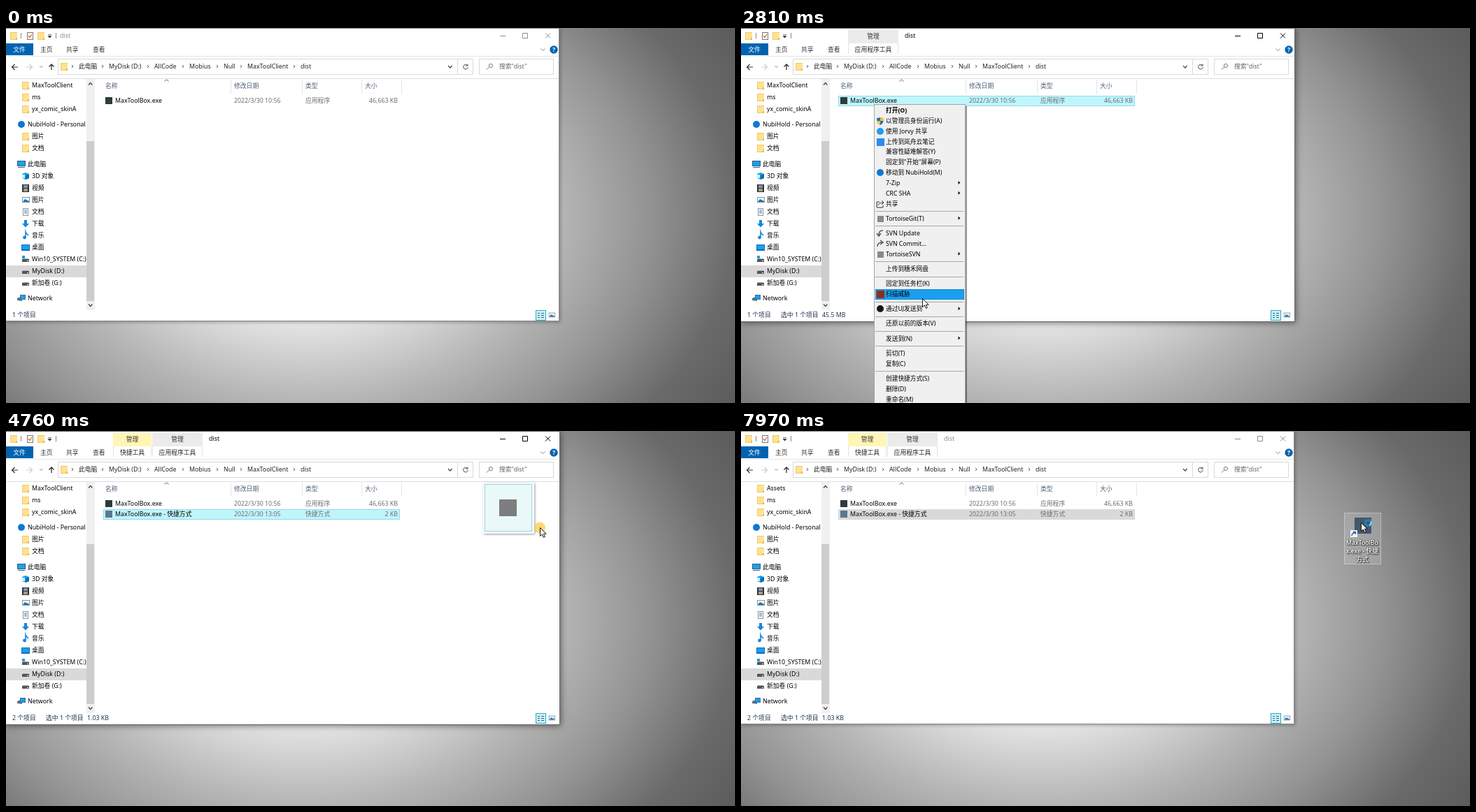
Recreate the animation shown at these times as an HTML page with a canvas. Size 1042 by 537 pixels, loop 8 s.

```html
<!DOCTYPE html>
<html lang="zh-CN">
<head>
<meta charset="utf-8">
<title>dist</title>
<style>
  html, body { margin: 0; width: 100%; height: 100%; overflow: hidden; background: #888; }
  canvas { display: block; }
</style>
</head>
<body>
<canvas id="stage" width="1042" height="537"></canvas>
<script>
const g = document.getElementById('stage').getContext('2d');
const LOOP = 8000;
const FONT = '"Noto Sans", "Noto Sans CJK SC", sans-serif';
const BLUE = '#0063b1', SKY = '#1a9ff0';

// Moments when the state switches
const FOCUS = 840, MENU = 1460, PICK = 3600, CREATED = 3760, DRAG = 4320, DROP = 5190, PLACED = 5570, BUSY = 6680;
const clicks = [[840, 1150], [1370, 1500], [3460, 3600], [DRAG, DROP], [6400, 6490], [6570, 6660]];

// Pointer path: time, x, y
const route = [
  [150, 582, 507], [350, 400, 290], [500, 240, 140], [600, 198, 111], [680, 190, 108],
  [1940, 190, 108], [2080, 212, 118], [2270, 236, 126], [2600, 236, 126], [2700, 243, 230],
  [2810, 259, 387], [2950, 262, 455], [3160, 256, 497], [3650, 256, 497], [3850, 240, 350],
  [3980, 228, 210], [4080, 225, 163], [4240, 222, 119], [4400, 222, 119], [4560, 420, 130],
  [4760, 762, 138], [4900, 840, 143], [5060, 864, 144], [5420, 864, 144], [5570, 854, 150],
  [5790, 854, 150], [5940, 870, 129], [6270, 870, 129], [6380, 886, 131]
];

function pointerAt(t) {
  const i = route.findIndex(k => k[0] > t);
  if (i < 0) return route.at(-1).slice(1);
  if (i === 0) return route[0].slice(1);
  const [a, b] = [route[i - 1], route[i]], p = (t - a[0]) / (b[0] - a[0]);
  return [a[1] + (b[1] - a[1]) * p, a[2] + (b[2] - a[2]) * p];
}

function rect(x, y, w, h, fill, border) {
  if (fill) { g.fillStyle = fill; g.fillRect(x, y, w, h); }
  if (border) { g.strokeStyle = border; g.lineWidth = 1; g.strokeRect(x + .5, y + .5, w - 1, h - 1); }
}
function text(str, x, y, color = '#000', align = 'left', weight = 400, size = 8.8) {
  g.font = `${weight} ${size}px ${FONT}`;
  g.textAlign = align;
  g.fillStyle = color;
  g.fillText(str, x, Math.round(y + 3));
}
function path(d, stroke, fill, width = 1) {
  const p = new Path2D(d);
  if (fill) { g.fillStyle = fill; g.fill(p); }
  if (stroke) { g.strokeStyle = stroke; g.lineWidth = width; g.stroke(p); }
}
function dot(x, y, r, fill) {
  g.fillStyle = fill;
  g.beginPath();
  g.arc(x, y, r, 0, 7);
  g.fill();
}
function at(x, y, draw) {
  g.save();
  g.translate(x, y);
  draw();
  g.restore();
}
function shadow(color, blur, offset) {
  g.shadowColor = color;
  g.shadowBlur = blur;
  g.shadowOffsetX = g.shadowOffsetY = offset;
}

// Icons are drawn around their centre
const icons = {
  folder() { rect(-5, -5, 10, 11, '#f4c95f'); rect(-4, -4, 9, 9, '#ffe196'); rect(3, 3, 2, 3, '#e9b84b'); },
  cloud() { dot(0, 0, 5, '#0f78d4'); },
  pc() { rect(-6, -5, 12, 8, SKY, '#3a5a78'); rect(-5, 4, 10, 1, '#3a5a78'); },
  cube() { path('M-5-3L0-5L5-3V3L0 5L-5 3Z', null, '#16a0dc'); path('M0-1L5-3V3L0 5Z', null, '#0b6fb0'); rect(-5, -2, 4, 5, '#c9f0ff'); },
  video() { rect(-5, -5, 10, 11, '#333'); rect(-3, -4, 6, 4, '#8192b8'); rect(-3, 1, 6, 4, '#a99c8a'); },
  picture() { rect(-5, -4, 11, 8, '#eef6fa', '#8a949c'); path('M-4 3L-1-1L5 2V3Z', null, '#1874b8'); },
  doc() { rect(-4, -5, 8, 11, '#fff', '#8795a3'); path('M-2-2H2M-2 0H2M-2 2H2', '#3f83b8'); },
  download() { path('M-2-5H2V0H5L0 5.5L-5 0H-2Z', null, '#1687dc'); },
  music() { path('M0 3V-5Q1-2 4 0', '#1687dc', null, 1.6); dot(-1.5, 3, 2.4, '#1687dc'); },
  desktop() { rect(-6, -4, 12, 9, '#0a6fb8'); rect(-5, -3, 10, 6, SKY); },
  drive() { rect(-5, 0, 10, 4, '#555'); rect(-4, -1, 8, 1, '#aaa'); rect(2, 2, 2, 1, '#fff'); },
  system() { icons.drive(); rect(-5, -5, 4, 4, SKY); },
  network() { path('M-6 0L1-3V4L-6 3Z', null, '#57738d'); rect(-2, -5, 8, 7, SKY, '#3a6f9b'); },
  shield() { path('M-5-4Q-2-4 0-5Q2-4 5-4Q5 4 0 6Q-5 4-5-4Z', null, '#1d70b8'); path('M0-5Q2-4 5-4V0H0ZM-5 0H0V6Q-4 4-5 0Z', null, '#f6c53a'); },
  chat() { dot(0, 0, 5, SKY); },
  note() { rect(-5, -5, 11, 11, '#2d8cf0'); },
  share() { path('M-1-3H-5V5H4V2M-3 2Q-2-2 5-2M2-5L5-2L2 1', '#333'); },
  gray() { rect(-4, -4, 9, 9, '#8a8a8a'); },
  update() { path('M4-4Q-2-5-2 3M-5 0L-2 4L1 0', '#555', null, 1.5); },
  commit() { path('M-4 4Q-4-2 3-2M0-5L4-2L0 1', '#555', null, 1.5); },
  guard() { rect(-5, -5, 11, 11, '#8e2f1c'); },
  messenger() { dot(0, 0, 5, '#151515'); }
};
const icon = (name, x, y) => at(x, y, icons[name]);

// Label, icon, indent level, y
const sidebar = [
  ['MaxToolClient', 'folder', 1, 82], ['ms', 'folder', 1, 99], ['yx_comic_skinA', 'folder', 1, 116],
  ['NubiHold - Personal', 'cloud', 0, 138], ['图片', 'folder', 1, 155], ['文档', 'folder', 1, 172],
  ['此电脑', 'pc', 0, 195], ['3D 对象', 'cube', 1, 212], ['视频', 'video', 1, 229],
  ['图片', 'picture', 1, 246], ['文档', 'doc', 1, 263], ['下载', 'download', 1, 280],
  ['音乐', 'music', 1, 297], ['桌面', 'desktop', 1, 314], ['Win10_SYSTEM (C:)', 'system', 1, 331],
  ['MyDisk (D:)', 'drive', 1, 348], ['新加卷 (G:)', 'drive', 1, 365], ['Network', 'network', 0, 387]
];
const crumbs = [['此电脑', 104], ['MyDisk (D:)', 147], ['AllCode', 212], ['Mobius', 262], ['Null', 311], ['MaxToolClient', 345], ['dist', 421]];

// "-" marks a separator, ">" a submenu
const menu = [];
let menuY = 118;
for (const entry of ['打开(O)', '以管理员身份运行(A)|shield', '使用 Jorvy 共享|chat', '上传到岚舟云笔记|note',
  '兼容性疑难解答(Y)', '固定到"开始"屏幕(P)', '移动到 NubiHold(M)|cloud', '7-Zip||>', 'CRC SHA||>', '共享|share', '-',
  'TortoiseGit(T)|gray|>', '-', 'SVN Update|update', 'SVN Commit...|commit', 'TortoiseSVN|gray|>', '-',
  '上传到穗禾网盘', '-', '固定到任务栏(K)', '扫描威胁|guard', '-', '通过UJ发送到|messenger|>', '-',
  '还原以前的版本(V)', '-', '发送到(N)||>', '-', '剪切(T)', '复制(C)', '-',
  '创建快捷方式(S)', '删除(D)', '重命名(M)']) {
  if (entry === '-') { menu.push({ line: Math.round(menuY - 4.3) }); menuY += 6.35; continue; }
  const [label, pic, sub] = entry.split('|');
  menu.push({ label, pic, sub, y: menuY });
  menuY += 14.85;
}

function drawDesktop() {
  at(430, 270, () => {
    g.scale(1, 445 / 612);
    const grad = g.createRadialGradient(0, 0, 0, 0, 0, 765);
    [[0, 248], [.24, 236], [.47, 182], [.64, 147], [.8, 106], [1, 84]]
      .forEach(([p, v]) => grad.addColorStop(p, `rgb(${v},${v},${v})`));
    g.fillStyle = grad;
    g.fillRect(-430, -400, 1042, 800);
  });
}

function drawFrame(active) {
  const w = active ? 792 : 791, h = active ? 421 : 420;
  g.save();
  shadow(`rgba(0,0,0,${active ? .5 : .35})`, active ? 9 : 5, 1);
  rect(0, 0, w, h, '#fff');
  g.restore();
  rect(-1, 0, w + 1, h, null, active ? '#666' : '#8c8c8c');
}

function drawTab(x, w, label, fill) {
  rect(x, 3, w, 19, fill);
  path(`M${x + .5} 22V37M${x + w - .5} 22V37`, '#e2e2e2');
  text('管理', x + w / 2, 12, '#333', 'center');
  text(label, x + w / 2, 31, '#222', 'center');
}

function drawHeader(t, active) {
  const ink = active ? '#000' : '#8a8a8a';
  icon('folder', 11, 11);
  path('M21.5 7V15M71.5 7V15', '#888');
  rect(30, 6, 9, 11, '#fff', '#777');
  path('M32 11L34 13.5L37 9', '#d0632c', null, 1.3);
  icon('folder', 50, 11);
  path('M60 9.5H65M60 11.5H65L62.5 14Z', '#222', '#222', .6);
  const tabs = t < FOCUS + 60 ? 0 : t < DRAG + 80 ? 1 : 2;
  if (tabs === 1) drawTab(153, 72, '应用程序工具', '#ebebeb');
  if (tabs === 2) {
    drawTab(153, 55, '快捷工具', '#fff6b5');
    drawTab(209, 72, '应用程序工具', '#ebebeb');
  }
  text('dist', [77, 234, 290][tabs], 11, ink);
  path('M706 11.5H714M738.5 7.5H745.5V14.5H738.5ZM771 7.5L778 14.5M778 7.5L771 14.5', ink);

  rect(0, 22, 39, 17, BLUE);
  text('文件', 19, 31, '#fff', 'center');
  text('主页', 49, 31, '#333');
  text('共享', 86, 31, '#333');
  text('查看', 124, 31, '#333');
  path('M764.5 29.5L767.5 32.5L770.5 29.5', '#888');
  dot(783, 31, 5.7, BLUE);
  text('?', 783, 31, '#fff', 'center', 700);
  rect(0, 40, 790, 1, '#e6e6e6');

  path('M17 56H9M12.5 52L8.5 56L12.5 60', '#333', null, 1.2);
  path('M29 56H37M33.5 52L37.5 56L33.5 60', '#ccc', null, 1.2);
  path('M48.5 54.5L50.5 56.5L52.5 54.5', '#888');
  path('M65 60V52M61.5 55.5L65 52L68.5 55.5', '#333', null, 1.3);
  rect(74, 44, 594, 23, '#fff', '#d9d9d9');
  rect(645, 45, 1, 21, '#d9d9d9');
  rect(676, 44, 107, 23, '#fff', '#d9d9d9');
  icon('folder', 83, 55);
  for (const x of [95, 138, 203, 253, 302, 336, 412]) path(`M${x - 1} 53L${x + 1} 55L${x - 1} 57`, '#555');
  for (const [label, x] of crumbs) text(label, x, 55, '#222');
  path('M632 54L634.8 57L637.6 54', '#444', null, 1.2);
  path('M659 53A3.3 3.3 0 1 0 660.3 56M660 51.5V54H657', '#444');
  path('M690.5 56L687 59.5M690.3 54A2.6 2.6 0 1 1 695.5 54A2.6 2.6 0 1 1 690.3 54', '#777');
  text('搜索"dist"', 705, 55, '#666');
  rect(0, 72, 790, 1, '#dedede');
}

function drawSidebar(t) {
  rect(0, 340, 115, 17, '#d9d9d9');
  sidebar.forEach(([label, pic, level, y], i) => {
    icon(pic, level ? 28 : 22, y);
    text(i === 0 && t >= PLACED ? 'Assets' : label, level ? 37 : 31, y);
  });
  rect(115, 73, 12, 331, '#f0f0f0');
  rect(115, 162, 11, 229, '#cdcdcd');
  path('M118 81.5L120.7 78.5L123.4 81.5M118 395.5L120.7 398.5L123.4 395.5', '#444', null, 1.3);
}

function drawRow(y, cells, color, fill, border) {
  if (fill || border) rect(139, y - 7, 424, 15, fill, border);
  rect(142, y - 5, 10, 10, color);
  text(cells[0], 156, y);
  text(cells[1], 326, y, '#6d6d6d');
  text(cells[2], 428, y, '#6d6d6d');
  text(cells[3], 560, y, '#6d6d6d', 'right');
}

function drawFiles(t, [, py]) {
  [['名称', 142], ['修改日期', 326], ['类型', 428], ['大小', 513]].forEach(([s, x]) => text(s, x, 83, '#4c607a'));
  for (const x of [321, 423, 508, 565]) rect(x, 74, 1, 20, '#e5e5e5');
  path('M226.5 76.5L229.5 73.8L232.5 76.5', '#666');

  const over = (top, from, to) => t >= from && t < to && py >= top && py < top + 15;
  const selected = ['#c0f5fc', '#8edcec'], hover = ['#e2faff'];
  let look = [];
  if (t >= FOCUS && t < CREATED) look = selected;
  else if (t >= CREATED && t < DRAG) look = [null, '#7fd0ee'];
  else if (over(97, 150, FOCUS)) look = hover;
  drawRow(104, ['MaxToolBox.exe', '2022/3/30 10:56', '应用程序', '46,663 KB'], '#2f3a3c', ...look);
  if (t >= CREATED) {
    look = t >= DROP ? ['#d9d9d9'] : t >= DRAG ? selected : over(112, CREATED, DRAG) ? hover : [];
    drawRow(119, ['MaxToolBox.exe - 快捷方式', '2022/3/30 13:05', '快捷方式', '2 KB'], '#5a7890', ...look);
  }

  const ink = '#1f3350';
  text(`${t < CREATED ? 1 : 2} 个项目`, 9, 411, ink);
  if (t >= FOCUS) {
    text('选中 1 个项目', 57, 411, ink);
    text(t < DRAG + 40 ? '45.5 MB' : '1.03 KB', 116, 411, ink);
  }
  rect(757, 404, 15, 15, '#c5f3fa', '#35a5c4');
  path('M760 408.5H763M760 411.5H763M760 414.5H763M765 408.5H769M765 411.5H769M765 414.5H769', '#557');
  at(780, 411, () => { g.scale(.85, .85); icons.picture(); });
}

function drawMenu(t, [px, py]) {
  g.globalAlpha = Math.min(1, (t - MENU) / 180);
  rect(321, 112, 2, 425, 'rgba(0,0,0,.4)');
  rect(190, 109, 131, 440, '#f0f0f0', '#a3a3a3');
  for (const { line, label, pic, sub, y } of menu) {
    if (line) { rect(192, line, 126, 1, '#a8a8a8'); continue; }
    if (px > 191 && Math.abs(py - y) < 7.43) rect(192, Math.round(y - 7), 127, 15, SKY, '#1488d4');
    if (pic) icon(pic, 199, Math.round(y));
    text(label, 207, y, '#000', 'left', label === '打开(O)' ? 700 : 400, 8.7);
    if (sub) path(`M310.5 ${y - 3}L313.5 ${y - .5}L310.5 ${y + 2}Z`, null, '#111');
  }
  g.globalAlpha = 1;
}

function drawDragged([x, y]) {
  at(Math.round(x), Math.round(y), () => {
    g.save();
    shadow('rgba(0,0,0,.4)', 3, 1);
    rect(-81, -64, 73, 73, '#f4fbfb');
    g.restore();
    rect(-79, -62, 68, 68, '#e9f9f9', '#a9cdd3');
    rect(-58, -40, 25, 24, '#7d7d7d');
    if (x > 791) {
      rect(12, 19, 64, 16, '#fff', '#c4c4c4');
      path('M16 27H22M19.5 24L22.5 27L19.5 30', '#1661c0', null, 1.6);
      text('移动到 桌面', 25, 27, '#1a4a9c', 'left', 400, 8.2);
    }
  });
}

function drawShortcut(t) {
  rect(862, 117, 53, 74, `rgba(255,255,255,${t < 5860 ? .1 : .15})`, 'rgba(255,255,255,.3)');
  rect(877, 124, 24, 23, '#44586b');
  rect(871, 142, 10, 10, '#f5f5f5');
  path('M873 150Q873 146 878 145.5M875 144.5H878.5V148', '#1c64b8', null, 1.4);
  g.save();
  ['MaxToolBo', 'x.exe - 快捷', '方式'].forEach((s, i) => {
    for (const offset of [0, 1]) {
      shadow('#000', 2, offset);
      text(s, 888, 160 + i * 12, '#fff', 'center');
    }
  });
  g.restore();
}

function drawPointer(t, [x, y]) {
  if (clicks.some(([a, b]) => t >= a && t < b)) dot(x + .5, y + .5, 8, 'rgba(255,200,60,.7)');
  at(Math.round(x) + .5, Math.round(y) + .5, () =>
    path('M0 0V12L2.8 9.4L4.8 13.8L6.8 13L4.9 8.7H8.6Z', '#000', '#fff', .9));
  if (t >= BUSY) at(896.5, 131.5, () => {
    g.rotate(t / 160);
    path('M4 0A4 4 0 1 1-4 0A4 4 0 1 1 4 0', '#1a86d0', null, 2.4);
    path('M4 0A4 4 0 0 1 0 4', '#7fd6fa', null, 2.4);
  });
}

function draw() {
  const t = performance.now() % LOOP;
  const pointer = pointerAt(t), active = t >= FOCUS && t < DROP;
  drawDesktop();
  drawFrame(active);
  drawHeader(t, active);
  drawSidebar(t);
  drawFiles(t, pointer);
  if (t >= PLACED) drawShortcut(t);
  if (t >= MENU && t < PICK) drawMenu(t, pointer);
  if (t >= 4440 && t < DROP) drawDragged(pointer);
  if (t >= 150) drawPointer(t, pointer);
  requestAnimationFrame(draw);
}
draw();
</script>
</body>
</html>
```
